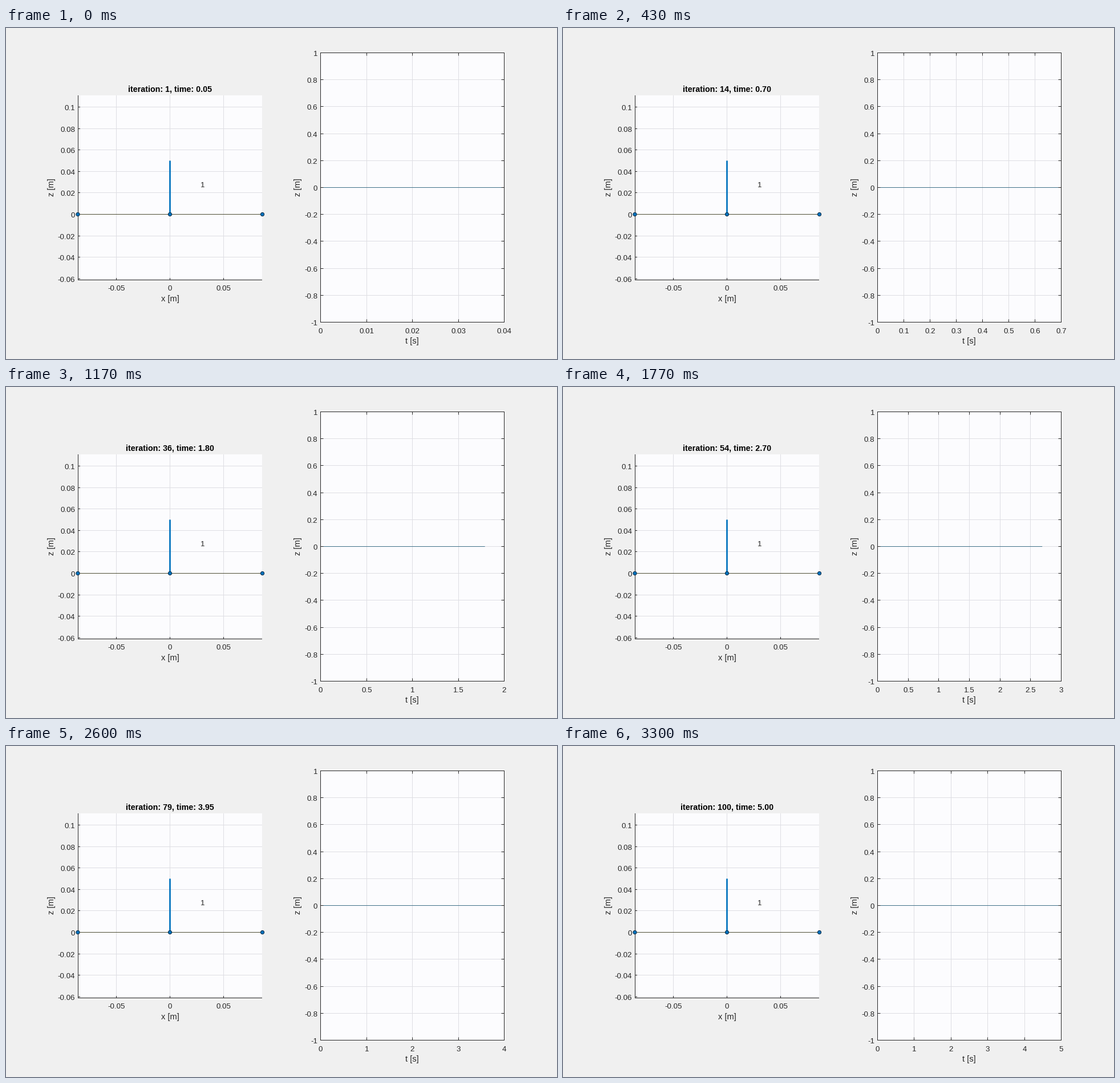
These frames come from a looping animation (966x580 px, 3330 ms). A matplotlib script:

```python
import math

import matplotlib.pyplot as plt
from matplotlib.animation import FuncAnimation
from matplotlib.collections import LineCollection
from matplotlib.patches import Circle, Rectangle

W, H, DPI = 966, 580, 100
PX = 72 / DPI
TICK_MS, TICKS = 10, 333
INK, GRID, PAPER, BLUE = "#262626", "#dedee3", "#fcfcfe", "#0072bd"
TICK_SIZE, LABEL_SIZE, TITLE_SIZE = 13.33, 14.67, 14.2

# Left plot: scene with a square aspect
SX0, SX1, SY0, SY1 = 126.5, 449.5, 118, 441.5
SCALE, ORIGIN_X, ORIGIN_Y = 1880, 287.5, 326.5
# Right plot: z over t
PX0, PX1, PY0, PY1 = 551.5, 873.5, 43.5, 515.5
ZERO_Y = (PY0 + PY1) / 2

plt.rcParams["font.family"] = "Liberation Sans"
fig = plt.figure(figsize=(W / DPI, H / DPI), dpi=DPI, facecolor="#f0f0f0")
ax = fig.add_axes([0, 0, 1, 1])
ax.set_xlim(0, W)
ax.set_ylim(H, 0)
ax.axis("off")


def mid(v):
    """Centre of the pixel that holds v."""
    return math.floor(v) + 0.5


def hline(y, x0, x1):
    return [(x0, y), (x1, y)]


def vline(x, y0, y1):
    return [(x, y0), (x, y1)]


def lines(segments, color, width=1, z=2):
    group = LineCollection(segments, colors=color, linewidths=width * PX,
                           zorder=z, snap=False, capstyle="butt")
    ax.add_collection(group, autolim=False)
    return group


def label(x, y, s, size=TICK_SIZE, ha="center", color=INK, **kw):
    return ax.text(x, y, s, fontsize=size * PX, ha=ha, va="baseline",
                   color=color, zorder=6, **kw)


def axis_names(x_name, x, x_base, z_base):
    label(x, x_base, x_name, LABEL_SIZE)
    label(z_base, ZERO_Y, "z [m]", LABEL_SIZE,
          rotation=90, rotation_mode="anchor")


def paper(x0, x1, y0, y1):
    ax.add_patch(Rectangle((x0, y0), x1 - x0, y1 - y0, fc=PAPER, ec="none",
                           zorder=0, snap=False))


def draw_scene():
    left, right, bottom = SX0 - 0.5, SX1 - 0.5, SY1 + 0.5
    paper(left, right, SY0, bottom)
    grid, ticks = [], []
    for i in range(-3, 6):
        z = i * 0.02
        y = mid(ORIGIN_Y - z * SCALE)
        grid.append(hline(y, SX0, right))
        ticks.append(hline(y, SX0, SX0 + 3.5))
        label(121, y + 5.3, f"{z:g}", ha="right")
    for i in (-1, 0, 1):
        x = mid(ORIGIN_X + i * 0.05 * SCALE)
        grid.append(vline(x, SY0, SY1))
        ticks.append(vline(x, SY1, SY1 - 3.5))
        label(x, 460, f"{i * 0.05:g}")
    lines(grid, GRID, z=1)
    lines(ticks + [vline(SX0, SY0, bottom), hline(SY1, left, right)], INK)
    axis_names("x [m]", 287.5, 479, 84)

    lines([hline(ORIGIN_Y, SX0, right)], "#4f4f35", z=3)
    lines([vline(ORIGIN_X, ORIGIN_Y - 0.05 * SCALE, ORIGIN_Y)], BLUE, 2.7, z=4)
    for x in (left, ORIGIN_X, SX1):
        ax.add_patch(Circle((x, ORIGIN_Y), 3.1, fc=BLUE, ec="#0c2c46",
                            lw=PX, zorder=5))
    label(345, 278.8, "1")


def draw_plot():
    paper(551, 874, 43, 516)
    grid, ticks = [], []
    for i in range(-5, 6):
        y = mid(ZERO_Y - i * (PY1 - PY0) / 10)
        grid.append(hline(y, PX0, PX1))
        ticks += [hline(y, PX0, PX0 + 5), hline(y, PX1, PX1 - 5)]
        label(546, y + 5.3, f"{i / 5:g}", ha="right")
    lines(grid, GRID, z=1)
    frame = [hline(PY0, 551, 874), hline(PY1, 551, 874),
             vline(PX0, 43, 516), vline(PX1, 43, 516)]
    lines(ticks + frame, INK, z=4)
    axis_names("t [s]", 712, 553.5, 516.3)


draw_scene()
draw_plot()
title = label(287.5, 112, "", TITLE_SIZE, color="black", weight="bold")
t_grid = lines([], GRID, z=1)
t_ticks = lines([], INK, z=4)
curve = lines([], "#3f7088", z=3)
MAX_STEPS = 7
t_labels = [label(0, 535, "") for _ in range(MAX_STEPS + 1)]


def t_axis(t_max):
    """Tick step and count, in hundredths of a second."""
    for step in (1, 2, 5, 10, 20, 50, 100):
        count = math.ceil(t_max / step)
        if count <= MAX_STEPS:
            return step, count


def update(tick):
    iteration = 1 + int((tick + 0.5) * 0.3)
    title.set_text(f"iteration: {iteration}, time: {iteration * 0.05:.2f}")

    t_max = 5 * iteration - 1
    step, count = t_axis(t_max)
    xs = [mid(PX0 + i * (PX1 - PX0) / count) for i in range(count + 1)]
    t_grid.set_segments([vline(x, PY0, PY1) for x in xs])
    t_ticks.set_segments([vline(x, PY0, PY0 + 5) for x in xs]
                         + [vline(x, PY1, PY1 - 5) for x in xs])
    for i, text in enumerate(t_labels):
        text.set_visible(i <= count)
        if i <= count:
            text.set_x(xs[i])
            text.set_text(f"{i * step / 100:g}")

    end = PX0 + (PX1 - PX0) * t_max / (step * count)
    curve.set_segments([hline(ZERO_Y, PX0, end)])
    return [title, t_grid, t_ticks, curve, *t_labels]


anim = FuncAnimation(fig, update, frames=TICKS, interval=TICK_MS,
                     init_func=lambda: update(0), repeat=True,
                     repeat_delay=0, blit=False)
plt.show()
```
